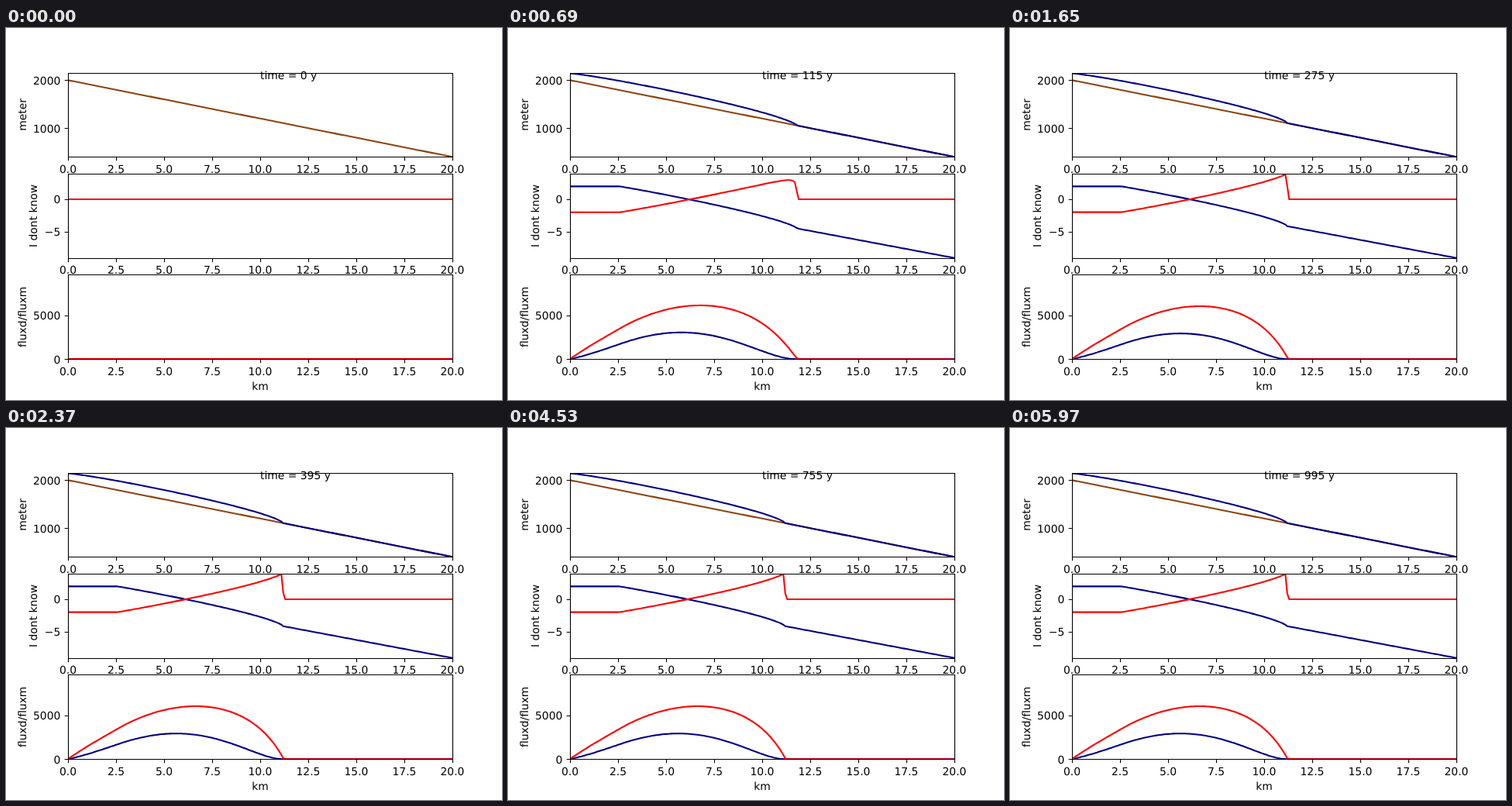
An HTML page for the animation above (6000 ms loop, 640 by 480 pixels).

```html
<!DOCTYPE html>
<html lang="en">
<head>
<meta charset="utf-8">
<title>Glacier model</title>
<style>
html, body { margin: 0; width: 100%; height: 100%; overflow: hidden; background: #fff; }
svg { display: block; font: 13.89px "DejaVu Sans", sans-serif; text-rendering: geometricPrecision; }
.curve { fill: none; stroke-width: 2.083; stroke-linejoin: round; }
.axis { fill: none; stroke: #000; stroke-width: 1.11; }
</style>
</head>
<body>
<svg id="stage" width="640" height="480" viewBox="0 0 640 480"></svg>
<script>
const start = performance.now();
const STEP_MS = 30, STEPS = 200, YEARS = 5;
const LEFT = 80, WIDTH = 496, HEIGHT = 108.706;
const BROWN = "#8b4513", NAVY = "#000080", RED = "#ff0000";

// Shallow-ice glacier on a uniform slope: sliding plus deformation
const N = 201, DX = 100, DT = 1 / 160;
const YEAR = 3.1557e7, RHO_G3 = (917 * 9.81) ** 3;
const SLIDE = 5.7e-20 * RHO_G3 * YEAR;
const DEFORM = 0.4 * 1.9e-24 * RHO_G3 * YEAR;
const OLD_ELA = 1500, ELA = 1700, SETTLED = 90;

const array = () => new Float64Array(N);
const bed = array().map((_, i) => 2000 - 8 * i);
const ice = array().map((_, i) => Math.max(0, 240 - 1.45 * i));
const surface = array(), balance = array();
const spread = array(), deform = array(), slide = array();

function advance(years, ela) {
  for (let n = Math.round(years / DT); n > 0; n--) {
    for (let i = 0; i < N; i++) surface[i] = bed[i] + ice[i];
    for (let i = 1; i < N; i++) {
      const s = (surface[i - 1] - surface[i]) / DX;
      const H = (ice[i - 1] + ice[i]) / 2;
      const hs = H * s, drive = hs * hs * hs;
      slide[i] = SLIDE * drive;
      deform[i] = DEFORM * drive * H * H;
    }
    for (let i = 0; i < N; i++) {
      const j = Math.min(i + 1, N - 1);
      balance[i] = Math.min(2, 0.007 * (surface[i] - ela));
      spread[i] = (slide[i] + deform[i] - slide[j] - deform[j]) / DX;
      ice[i] = Math.max(0, ice[i] + DT * (balance[i] + spread[i]));
    }
  }
}

const snapshot = () => [surface, balance, spread, deform, slide].map(a => a.slice());
const states = [Array.from({ length: 5 }, array)];
advance(250, OLD_ELA);
while (states.length < SETTLED) {
  advance(YEARS, ELA);
  states.push(snapshot());
}

// Chart
const stage = document.getElementById("stage");
function add(tag, attrs, text = "") {
  const el = document.createElementNS("http://www.w3.org/2000/svg", tag);
  for (const key in attrs) el.setAttribute(key, attrs[key]);
  el.textContent = text;
  return stage.appendChild(el);
}
const label = (x, y, text, anchor, more = {}) =>
  add("text", { x, y, "text-anchor": anchor, ...more }, text);
const snap = v => Math.floor(v + 0.5) + 0.5;

function panel(top, min, max, ticks, name, nameX) {
  const bottom = top + HEIGHT;
  const y = v => bottom - (v - min) / (max - min) * HEIGHT;
  const y0 = snap(top), y1 = snap(bottom);
  const clip = `polygon(80px ${y0 - 0.5}px, 577px ${y0 - 0.5}px, 577px ${y1 + 0.5}px, 80px ${y1 + 0.5}px)`;
  const curve = color => {
    const group = add("g", { style: `clip-path: ${clip} view-box` });
    const path = add("path", { class: "curve", stroke: color });
    group.appendChild(path);
    return values => {
      const flat = values.every(v => v === values[0]);
      let d = "";
      values.forEach((v, i) => {
        const py = flat ? Math.round(y(v)) : y(v).toFixed(2);
        d += (i ? "L" : "M") + (LEFT + i * WIDTH / (N - 1)).toFixed(2) + " " + py;
      });
      path.setAttribute("d", d);
    };
  };
  const frame = () => {
    let d = `M80.5 ${y0}H576.5V${y1}H80.5Z`;
    for (let i = 0; i <= 8; i++) {
      const x = LEFT + i * 62;
      d += `M${x + 0.5} ${y1}v4.86`;
      label(x, Math.round(bottom + 20.3), (i * 2.5).toFixed(1), "middle");
    }
    for (const t of ticks) {
      d += `M80.5 ${snap(y(t))}h-4.86`;
      label(70.3, Math.round(y(t) + 5.4), String(t).replace("-", "\u2212"), "end");
    }
    add("path", { class: "axis", d });
    const mid = top + HEIGHT / 2;
    label(nameX, mid, name, "middle", { transform: `rotate(-90 ${nameX} ${mid})` });
  };
  return { curve, frame };
}

const height = panel(57.6, 400, 2158, [1000, 2000], "meter", 26);
const rates = panel(188.047, -9.1, 3.96, [-5, 0], "I dont know", 40);
const fluxes = panel(318.494, 0, 9650, [0, 5000], "fluxd/fluxm", 26);

height.curve(BROWN)(bed);
const curves = [
  height.curve(NAVY), rates.curve(NAVY), rates.curve(RED),
  fluxes.curve(NAVY), fluxes.curve(RED)
];
[height, rates, fluxes].forEach(p => p.frame());
label(328, 467, "km", "middle");
const clock = label(328, 66, "", "start");

let shown = -1;
function draw() {
  const step = Math.floor((performance.now() - start) / STEP_MS) % STEPS;
  if (step !== shown) {
    shown = step;
    const state = states[Math.min(step, SETTLED - 1)];
    curves.forEach((set, i) => set(state[i]));
    clock.textContent = `time = ${step * YEARS} y`;
  }
  requestAnimationFrame(draw);
}
draw();
</script>
</body>
</html>
```
